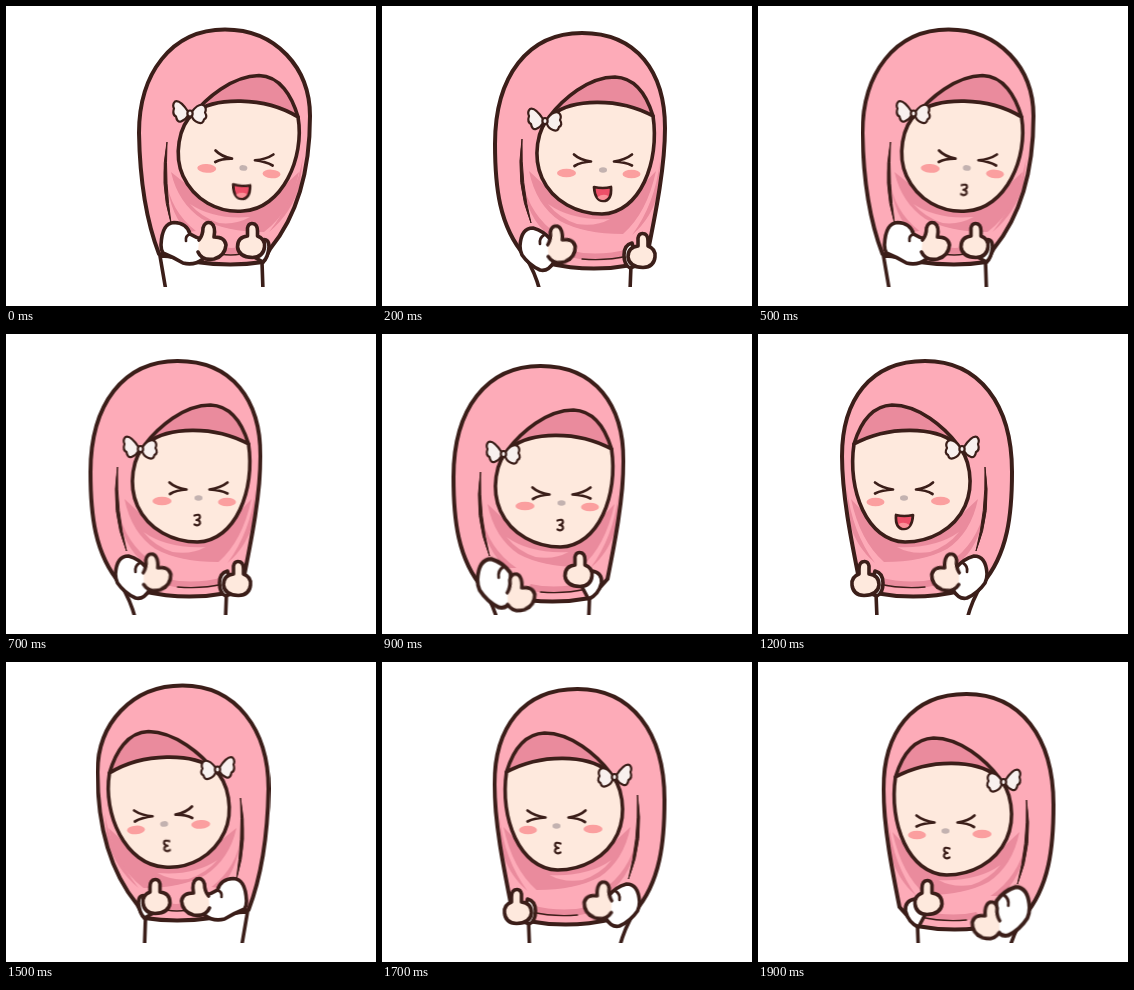
Write an HTML page without scripts that moves like this. It is 370 px wide and 300 px high and loops after 2 s.

```html
<!DOCTYPE html>
<html lang="en">
<head>
<meta charset="utf-8">
<title>Thumbs-up dance</title>
<style>
  html, body { margin: 0; width: 100%; height: 100%; overflow: hidden; background: #fff; }
  svg { display: block; width: 370px; height: 300px; }

  .ink { stroke: #3b1e19; stroke-width: 3.6; stroke-linejoin: round; stroke-linecap: round; }
  .line { fill: none; }
  .bold { stroke-width: 4; }
  .thin { stroke-width: 2.7; }
  .fine { stroke-width: 2.2; }
  .hair { stroke-width: 1.3; }
  .pink { fill: #fdabb8; }
  .shade { fill: #ea8b9d; }
  .skin { fill: #fee9dd; }
  .white { fill: #fff; }
  .blush { fill: #fb9f9f; }
  .dark { fill: #3b1e19; }

  .flip, .travel, .lean, .sway, .hand, .sleeve, .smile, .kiss, .low, .high {
    animation: 500ms step-end infinite;
  }

  /* Whole dance: left, then mirrored back to the right */
  .flip { animation-name: flip; animation-duration: 2s; }
  @keyframes flip { 50% { transform: translate(367px, 0) scaleX(-1); } }
  .travel { animation-name: travel; animation-duration: 1s; }
  @keyframes travel { 50% { transform: translate(-28.5px, 0); } }

  /* One beat: lean for two steps, sway for three */
  .lean { animation-name: lean; transform-origin: 206px 281px; }
  @keyframes lean {
    20% { transform: translate(-7px, .5px) rotate(-1.5deg); }
    40%, 100% { opacity: 0; }
  }
  .sway { animation-name: sway; }
  @keyframes sway {
    0% { opacity: 0; }
    40% { opacity: 1; transform: none; }
    60% { opacity: 1; transform: translate(-13px, 6px); }
    80%, 100% { opacity: 1; transform: translate(-13px, 5px); }
  }
  .hand { animation-name: hand; }
  @keyframes hand {
    60% { transform: translate(1px, 8px); }
    80%, 100% { transform: translate(1px, 15px); }
  }
  .sleeve { animation-name: sleeve; transform-origin: 155px 222px; }
  @keyframes sleeve {
    60% { transform: scale(1.03, 1.08); }
    80%, 100% { transform: translate(0, -2px) scale(1.06, 1.15); }
  }
  .low { animation-name: low; }
  @keyframes low { 60%, 100% { opacity: 0; } }
  .high { animation-name: high; }
  @keyframes high { 0% { opacity: 0; } 60%, 100% { opacity: 1; } }

  .smile { animation-name: smile; animation-duration: 1s; }
  @keyframes smile { 50%, 100% { opacity: 0; } }
  .kiss { animation-name: kiss; animation-duration: 1s; }
  @keyframes kiss { 0% { opacity: 0; } 50%, 100% { opacity: 1; } }
</style>
</head>
<body>
<svg viewBox="0 0 370 300">
  <defs>
    <clipPath id="stage"><path d="M0 0H370V281H0Z"/></clipPath>

    <path id="hoodLean" d="M153 248C143 222 134 185 133 127C133 68 165 23.500 219 23.500C270 23.500 304 62 304 110C304 165 291 210 264 243L257 256Q225 261 190 256Z"/>
    <path id="hoodSway" d="M143 250C117 220 113 180 113 138C113 70 146 27 200 27C255 27 283 66 283 122C283 160 274 205 267 240L250 259Q207 267 165 257Z"/>
    <clipPath id="inLean"><use href="#hoodLean"/></clipPath>
    <clipPath id="inSway"><use href="#hoodSway"/></clipPath>

    <g id="bow" class="ink fine" fill="#f8f0ee">
      <path d="M161 113Q153 101 148 103Q145 106 147 110Q145 116 149 118Q150 124 154 123Q159 121 161 117Z"/>
      <path d="M165 113Q172 104 177 107Q180 110 178 114Q181 119 177 121Q176 126 171 124Q166 122 165 118Z"/>
      <ellipse cx="163" cy="115" rx="2.600" ry="3"/>
    </g>

    <g id="face">
      <ellipse class="blush" cx="184.500" cy="167" rx="9.500" ry="4.300"/>
      <ellipse class="blush" cx="249.500" cy="168" rx="9" ry="4.300"/>
      <ellipse cx="221" cy="164" rx="4" ry="2.800" fill="#c3b2b0"/>
      <path class="ink line thin" d="M192 148.500Q198 154 209 155.500Q199 156 192.500 160M250 148.500Q243 154 232 155.500Q243 156 250 159.500"/>
    </g>
    <g id="smile">
      <path class="ink thin" fill="#ee4f68" d="M212 181Q221 183 229 181Q230 195 221 195Q213 195 212 181Z"/>
      <path fill="#fb8f98" d="M215.500 191Q221 187 226.500 190Q224 194 221 194Q217 194 215.500 191Z"/>
    </g>
    <path id="kiss" class="ink line fine" d="M217 181.500Q222.500 179.500 222.500 183Q222 185.500 219 186Q223 186.500 222.500 189.500Q221 192.500 217 190.500"/>

    <path id="bigHand" class="ink skin" d="M193 234Q197 229 197 222Q199 215 205 217Q210 220 208 231Q219 231 220 239Q219 250 208 253Q196 255 192 246"/>
    <path id="smallHand" class="ink skin" d="M240 230V222Q241 217 245 217.500Q250 218 250 225V230Q258 233 257 241Q256 251 245 251.500Q231 251 230 241Q230 231 240 230Z"/>
  </defs>

  <g clip-path="url(#stage)">
    <g class="flip"><g class="travel">

      <g class="lean">
        <path class="ink white" d="M154 250L160 285H257L256 256Z"/>
        <use href="#hoodLean" class="pink"/>
        <g clip-path="url(#inLean)">
          <path class="shade" d="M165 166Q172 197 196 213Q220 226 258 226Q286 205 293 166L280 178L240 204L195 190Z"/>
          <path class="shade" d="M160 172Q164 205 190 225L183 226Q165 213 160 172ZM297 150Q291 190 263 226Q286 207 294 178ZM214 240Q226 244 236 240V247Q226 249 214 247Z"/>
          <path class="pink" d="M184 198Q208 214 244 211Q230 219 213 217Q195 211 184 198Z"/>
          <path class="ink line hair" d="M214 248Q225 250 235 248"/>
        </g>
        <path class="dark" d="M161 136Q153 178 165 217Q159 178 161 136Z" stroke="#3b1e19"/>
        <path class="ink shade" d="M186 110C200 92 226 70 253 69.500C274 70 286 90 292 111Q235 85 186 110Z"/>
        <path class="ink skin" d="M292 111C258 90 208 91 188 107C172 120 168 150 177 170C188 194 212 207 237 205C276 203 299 152 292 111Z"/>
        <use href="#hoodLean" class="ink line bold"/>
        <g transform="translate(17 -2) rotate(4 221.500 155)">
          <use href="#face"/>
          <g class="smile"><use href="#smile"/></g>
          <g class="kiss"><use href="#kiss"/></g>
        </g>
        <use href="#bow" transform="translate(21 -7.500)"/>
        <path class="ink white" d="M155 239Q156 217 168 216.500Q181 217 184 228Q190 232 197 233V253Q188 260 177 257Q167 251 157 247Q155 244 155 239Z"/>
        <path class="ink line thin" d="M184 228Q179 230 180 235"/>
        <use href="#bigHand"/>
        <path class="ink white" d="M256 234Q263 232 263 241Q262 252 257 256L248 251Z"/>
        <use href="#smallHand" x="1.500"/>
      </g>

      <g class="sway">
        <path class="ink white" d="M143 250Q153 266 158 285H248L249 259Z"/>
        <use href="#hoodSway" class="pink"/>
        <g clip-path="url(#inSway)">
          <path class="shade" d="M147 165Q154 199 178 215Q202 228 241 228Q265 207 274 165L258 182L222 207L176 192Z"/>
          <path class="shade" d="M140 174Q148 210 176 229L167 229Q145 213 140 174ZM278 155Q273 198 250 229Q271 211 276 185ZM190 245Q216 251 247 243V251Q216 258 188 251Z"/>
          <path class="pink" d="M166 198Q190 215 228 213Q214 221 195 218Q177 212 166 198Z"/>
          <path class="ink line hair" d="M200 253Q224 255 246 250"/>
        </g>
        <path class="dark" d="M140 133Q133 178 149 217Q139 178 140 133Z" stroke="#3b1e19"/>
        <path class="ink shade" d="M167 111C181 93 206 71 233 71C254 72 265 90 271 110Q214 86 167 111Z"/>
        <path class="ink skin" d="M271 110C236 91 190 93 170 109C154 122 151 152 160 172C171 196 196 208 220 208C258 207 278 156 271 110Z"/>
        <use href="#hoodSway" class="ink line bold"/>
        <use href="#face"/>
        <g class="smile"><use href="#smile"/></g>
        <g class="kiss"><use href="#kiss"/></g>
        <use href="#bow"/>
        <g class="sleeve">
          <path class="ink white" d="M138 240Q139 222 151 222Q162 225 169 234L172 256Q166 266 158 264Q147 259 140 249Q138 245 138 240Z"/>
          <path class="ink line thin" d="M162 229Q157 232 158 238"/>
        </g>
        <g class="hand"><use href="#bigHand" transform="translate(-27 3) rotate(-7 206 236)"/></g>
        <g class="low">
          <path class="ink white" d="M250 237Q242 239 242 249Q242 259 248 262L256 259Z"/>
          <use href="#smallHand" x="16" y="10"/>
        </g>
        <g class="high">
          <path class="ink white" d="M252 232Q262 234 261 244Q258 256 248 260L241 247Z"/>
          <use href="#smallHand" x="-5.500" y="-4"/>
        </g>
      </g>

    </g></g>
  </g>
</svg>
</body>
</html>
```
